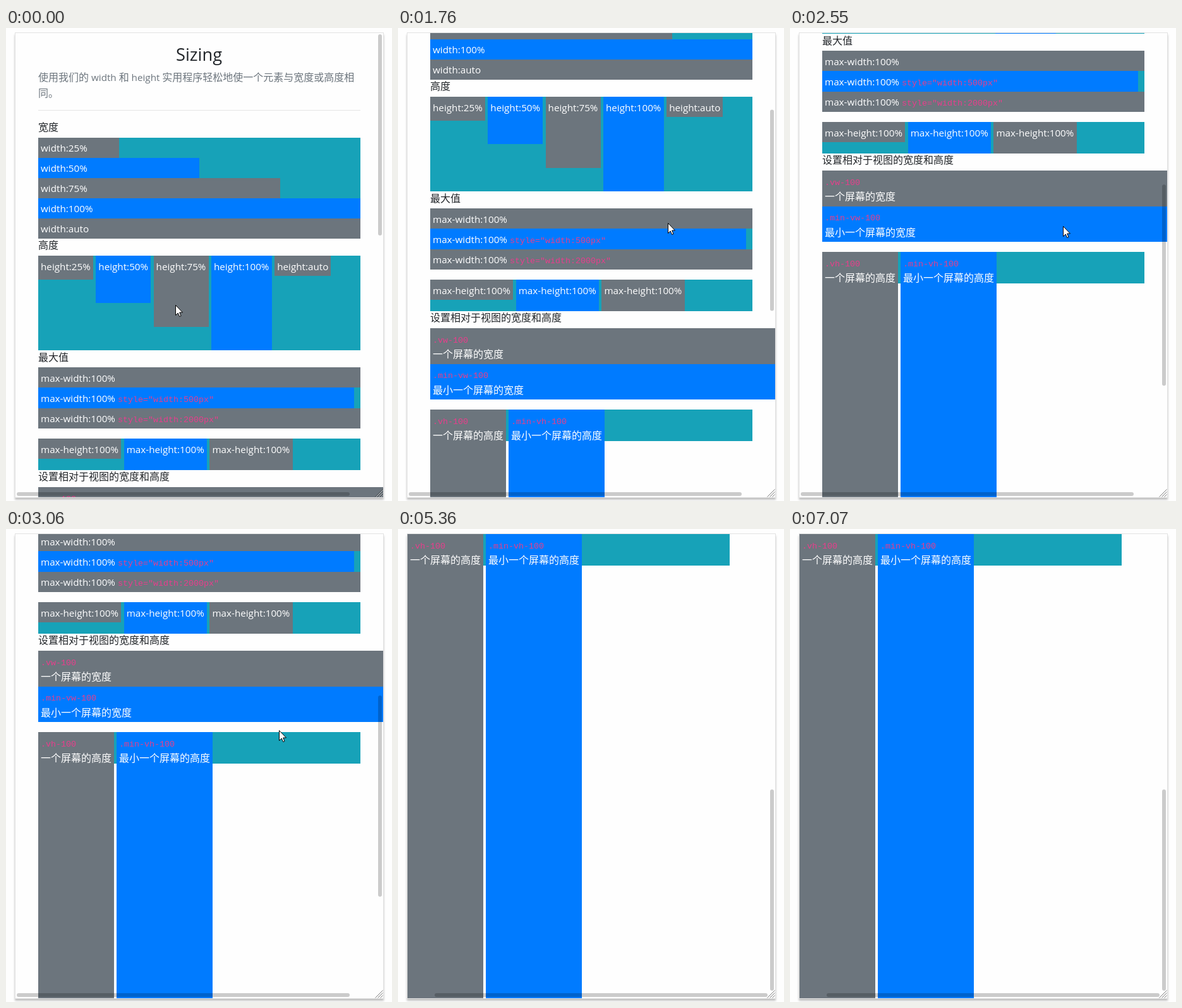
Recreate the animation shown at these times as an HTML page with a canvas. Size 611 by 750 pixels, loop 8000 ms.

```html
<!DOCTYPE html>
<html lang="zh">
<head>
<meta charset="utf-8">
<title>Sizing</title>
<style>
  html, body { margin: 0; width: 100%; height: 100%; overflow: hidden; background: #fefefe; }
  canvas { display: block; width: 611px; height: 750px; }
</style>
</head>
<body>
<canvas id="stage" width="611" height="750"></canvas>
<script>
const ctx = document.getElementById('stage').getContext('2d');
const LOOP = 8000, FIRST = 360, TICK = 133.4;
const VIEW = { x: 15, y: 8, w: 582, h: 736 };
const LEFT = 51, WIDTH = 510;
const MAX_Y = 849, MAX_X = 36, NOTCH = 168;

const TEAL = '#17a2b8', GREY = '#6c757d', BLUE = '#007bff';
const INK = '#212529', PINK = '#e83e8c', WHITE = '#fff', PAPER = '#fefefe';
const LATIN = '"Open Sans", "Noto Sans", sans-serif';
const CJK = '"Noto Sans CJK SC", "Noto Sans CJK", sans-serif';
const MONO = '"Liberation Mono", monospace';

// ---- Motion, measured in ticks ----

const ramp = (n, a, b) => Math.min(1, Math.max(0, (n - a) / (b - a)));
const ease = u => u < 0.5 ? 4 * u ** 3 : 1 - 4 * (1 - u) ** 3;

// Each turn of the wheel scrolls smoothly by one notch
const wheel = [5.65, 8.25, 13, 18.75, 21.33, 23.9];

function scrollY(n) {
  const sum = wheel.reduce((s, a) => s + NOTCH * ease(ramp(n, a, a + 3.5)), 0);
  return Math.min(MAX_Y, Math.round(sum));
}

// The horizontal bar is dragged right, left and right again
function scrollX(n) {
  return Math.round(MAX_X * (ramp(n, 34.3, 37) - ramp(n, 44, 46) + ramp(n, 48, 50)));
}

// Pointer path: [tick, x, y]
const path = [
  [-1, 268, 439], [1, 371, 366], [2, 418, 305], [3, 420, 301], [7, 425, 306],
  [16, 432, 314], [24, 431, 324], [25, 431, 324], [27, 433, 335], [29, 262, 529],
  [32, 134, 735], [33, 134, 755], [45, 68, 755], [46, 68, 745], [47, 68, 755]
];

function pointerAt(n) {
  let [, x, y] = path[0];
  for (let i = 1; i < path.length; i++) {
    const u = ramp(n, path[i - 1][0], path[i][0]);
    x += u * (path[i][1] - path[i - 1][1]);
    y += u * (path[i][2] - path[i - 1][2]);
  }
  return [Math.round(x), Math.round(y)];
}

// ---- Drawing helpers ----

// Edges snap to whole pixels
function box(x, y, w, h, color) {
  const l = Math.round(x), t = Math.round(y);
  ctx.fillStyle = color;
  ctx.fillRect(l, t, Math.round(x + w) - l, Math.round(y + h) - t);
}

// Latin runs are set slightly smaller than Chinese ones
function text(str, x, y, color = WHITE, size = 16) {
  ctx.fillStyle = color;
  for (const run of str.match(/[\u3000-\u9fff]+|[^\u3000-\u9fff]+/g)) {
    const wide = run.charCodeAt(0) >= 0x3000;
    ctx.font = wide ? `${size}px ${CJK}` : `${size * 0.952}px ${LATIN}`;
    ctx.fillText(run, x, Math.floor(y));
    x += ctx.measureText(run).width;
  }
}

function code(str, x, y) {
  ctx.fillStyle = PINK;
  ctx.font = `13.333px ${MONO}`;
  ctx.fillText(str, x, Math.floor(y));
}

const stripe = i => i % 2 ? BLUE : GREY;

function item(label, x, y, w, h, color, base = 23) {
  box(x, y, w, h, color);
  text(label, x + 4, y + base);
}

// Inline blocks flowing left to right: [label, width, height]
function flow(y, h, items) {
  box(LEFT, y, WIDTH, h, TEAL);
  let x = LEFT;
  items.forEach(([label, w, tall], i) => {
    item(label, x, y, w, tall, stripe(i));
    x += w + 4.3;
  });
}

function block(name, label, x, y, w, h, color) {
  box(x, y, w, h, color);
  code(name, x + 4, y + 23);
  text(label, x + 4, y + 47.5);
}

// ---- Page ----

function widths(y) {
  text('宽度', LEFT, y - 11, INK);
  box(LEFT, y, WIDTH, 160, TEAL);
  ['25%', '50%', '75%', '100%', 'auto'].forEach((v, i) => {
    const part = (parseInt(v) || 100) / 100;
    item('width:' + v, LEFT, y + i * 32, WIDTH * part, 32, stripe(i), 22);
  });
}

function heights(y) {
  text('高度', LEFT, y - 11, INK);
  flow(y, 150, [
    ['height:25%', 87, 37.5], ['height:50%', 87, 75], ['height:75%', 87, 112.5],
    ['height:100%', 96, 150], ['height:auto', 89, 32]
  ]);
}

function maxima(y) {
  const row = 32.4;
  text('最大值', LEFT, y - 10, INK);
  box(LEFT, y, WIDTH, 3 * row, TEAL);
  ['', '500', '2000'].forEach((px, i) => {
    const top = y + i * row;
    item('max-width:100%', LEFT, top, Math.min(px || WIDTH, WIDTH), row, stripe(i));
    if (px) code(`style="width:${px}px"`, 177, top + 23);
  });
  flow(y + 113, 50, [32, 50, 50].map(h => ['max-height:100%', 131.4, h]));
}

function relative(y) {
  text('设置相对于视图的宽度和高度', LEFT, y - 11, INK);
  block('.vw-100', '一个屏幕的宽度', LEFT, y, 583, 56.5, GREY);
  block('.min-vw-100', '最小一个屏幕的宽度', LEFT, y + 56.5, 583, 56.5, BLUE);
  const top = y + 129;
  box(LEFT, top, WIDTH, 50, TEAL);
  block('.vh-100', '一个屏幕的高度', LEFT, top, 120, VIEW.h, GREY);
  block('.min-vh-100', '最小一个屏幕的高度', 175, top, 152, VIEW.h, BLUE);
}

function page() {
  text('Sizing', 269, 52, INK, 28.6);
  text('使用我们的 width 和 height 实用程序轻松地使一个元素与宽度或高度相', LEFT, 84, GREY);
  text('同。', LEFT, 109, GREY);
  box(LEFT, 130, WIDTH, 1, 'rgba(0,0,0,.1)');
  widths(174);
  heights(361);
  maxima(538);
  relative(728);
}

// ---- Frame around the page ----

function panel() {
  ctx.save();
  ctx.shadowColor = 'rgba(0,0,0,.25)';
  ctx.shadowBlur = 3;
  ctx.shadowOffsetY = 3;
  box(14, 8, 584, 737, PAPER);
  ctx.restore();
  ctx.lineWidth = 1;
  ctx.strokeStyle = '#e2e2e2';
  ctx.strokeRect(14.5, 7.5, 583, 737);
  box(VIEW.x, VIEW.y, VIEW.w, VIEW.h, PAPER);
}

function thumb(x, y, w, h) {
  ctx.fillStyle = 'rgba(0,0,0,.2)';
  ctx.beginPath();
  ctx.roundRect(x, y, w, h, 3);
  ctx.fill();
}

// Dark diagonals, each with a light one beside it
function grip() {
  for (let d = 3; d <= 12; d++) {
    if (d % 4 > 0 && d % 4 < 3) continue;
    ctx.strokeStyle = d % 4 ? 'rgba(255,255,255,.6)' : 'rgba(0,0,0,.5)';
    ctx.beginPath();
    ctx.moveTo(596.5 - d, 743.5);
    ctx.lineTo(596.5, 743.5 - d);
    ctx.stroke();
  }
}

const arrow = new Path2D('M.5.5V16.5L4.2 13L6.7 18.5L9 17.5L6.7 12H11.5Z');

function drawPointer(x, y) {
  ctx.save();
  ctx.translate(x, y);
  ctx.fillStyle = WHITE;
  ctx.fill(arrow);
  ctx.strokeStyle = '#000';
  ctx.stroke(arrow);
  ctx.restore();
}

function draw(t) {
  const n = Math.floor((t - FIRST) / TICK);
  const sx = scrollX(n), sy = scrollY(n);
  box(0, 0, 611, 750, PAPER);
  panel();

  ctx.save();
  ctx.beginPath();
  ctx.rect(VIEW.x, VIEW.y, VIEW.w, VIEW.h);
  ctx.clip();
  ctx.translate(-sx, -sy);
  page();
  ctx.restore();

  thumb(589, 10 + 403 * sy / MAX_Y, 6, 319);
  thumb(17 + 41 * sx / MAX_X, 736, 527, 6);
  grip();
  drawPointer(...pointerAt(n));
}

const start = performance.now();
function tick() {
  draw((performance.now() - start) % LOOP);
  requestAnimationFrame(tick);
}
tick();
</script>
</body>
</html>
```
